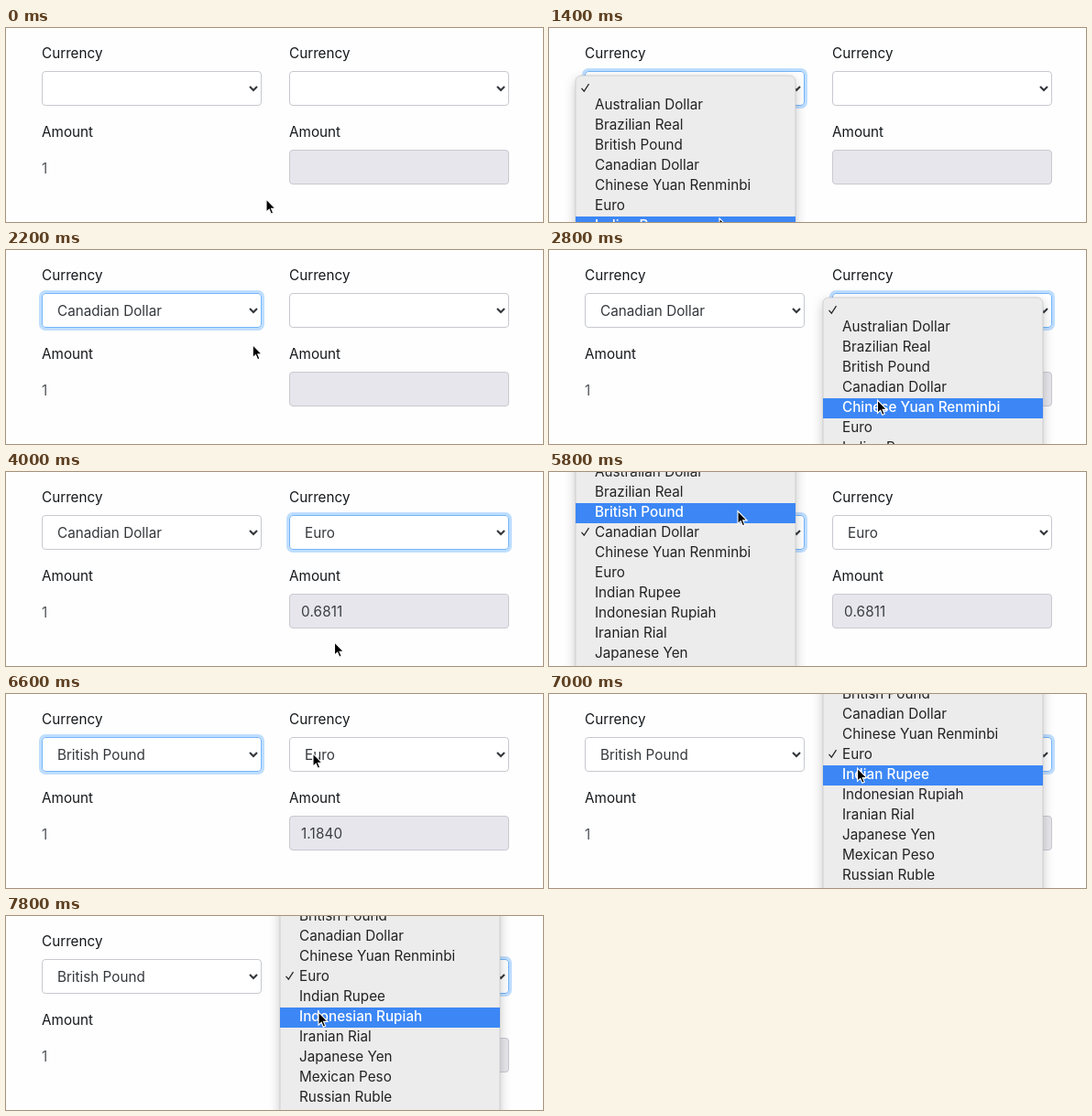
Recreate the animation shown at these times as an HTML page. Size 586 by 212 pixels, loop 8000 ms.

```html
<!DOCTYPE html>
<html lang="en">
<head>
<meta charset="utf-8">
<title>Currency converter</title>
<style>
  html, body { margin: 0; width: 100%; height: 100%; overflow: hidden; background: #fefefe; }
  svg { display: block; font: 430 15.25px Inter, "Liberation Sans", sans-serif; }
  .menu { filter: drop-shadow(0 4px 6px rgba(0, 0, 0, .22)); }
  .value { letter-spacing: .15px; }
</style>
</head>
<body>
<svg id="stage" width="586" height="212" viewBox="0 0 586 212"></svg>
<script>
const LOOP = 8000, STEP = 200, ROW = 22, MIDDLE = 65;
const options = ["", "Australian Dollar", "Brazilian Real", "British Pound", "Canadian Dollar",
  "Chinese Yuan Renminbi", "Euro", "Indian Rupee", "Indonesian Rupiah", "Iranian Rial",
  "Japanese Yen", "Mexican Peso", "Russian Ruble"];
const euros = { "Canadian Dollar": 0.6811, "British Pound": 1.184 };

// Each pick opens a column's menu, passes over one option and settles on another.
// dy is where the pointer tip sits relative to the option's text.
const picks = [
  { col: 0, over: "Indian Rupee", pick: "Canadian Dollar", x: 186, dy: -7,
    opens: 800, passes: 1400, settles: 1600, closes: 2000 },
  { col: 1, over: "Chinese Yuan Renminbi", pick: "Euro", x: 358.5, dy: -7,
    opens: 2600, passes: 2800, settles: 3000, closes: 3600 },
  { col: 0, over: "Canadian Dollar", pick: "British Pound", x: 206, dy: -.5,
    opens: 5000, passes: 5400, settles: 5800, closes: 6400 },
  { col: 1, over: "Iranian Rial", pick: "Indonesian Rupiah", x: 341, dy: -4,
    opens: 6800, passes: 7400, settles: 7800, closes: LOOP }
];

// The chosen row lies over the select; an empty choice has a shorter row.
const firstRow = chosen => chosen ? MIDDLE - ROW * options.indexOf(chosen) : MIDDLE - 4;

function stateAt(t) {
  const s = { chosen: ["", ""], open: -1, focus: -1 };
  for (const p of picks) {
    if (t < p.opens) break;
    s.focus = p.col;
    if (t < p.closes) s.open = p.col;
    else s.chosen[p.col] = p.pick;
  }
  return s;
}

function planPath() {
  const keys = [[0, 284, 187]];
  let freeAt = 0;
  for (const p of picks) {
    const top = firstRow(stateAt(p.opens).chosen[p.col]);
    const tip = name => top + ROW * options.indexOf(name) + p.dy;
    const [, x, y] = keys[keys.length - 1];
    keys.push(
      [Math.max(freeAt, p.opens - 800), x, y],
      [p.opens - 200, p.x - 6, MIDDLE],
      [p.opens, p.x - 6, MIDDLE],
      [p.passes, p.x, tip(p.over)],
      [p.settles, p.x, tip(p.pick)]);
    freeAt = p.closes;
  }
  return keys;
}
const path = planPath();

function pointerAt(t) {
  const i = path.findIndex(key => key[0] > t);
  if (i < 0) return path[path.length - 1].slice(1);
  const [t0, x0, y0] = path[i - 1], [t1, x1, y1] = path[i];
  const u = (t - t0) / (t1 - t0), k = u * u * (3 - 2 * u);
  return [x0 + (x1 - x0) * k, y0 + (y1 - y0) * k];
}

const text = (x, y, str, fill, rest = "") => `<text x="${x}" y="${y}" fill="${fill}" ${rest}>${str}</text>`;
const box = (x, y, w, h, rx, rest) =>
  `<rect x="${x}" y="${y}" width="${w}" height="${h}" rx="${rx}" ${rest}/>`;

function select(x, label, focused) {
  const ring = focused ? box(x - 1.5, 45.5, 243, 41, 5.5, 'fill="none" stroke="#bfdeff" stroke-width="3"') : "";
  return ring +
    box(x + .5, 47.5, 239, 37, 3.5, `fill="#fff" stroke="${focused ? "#74b5fb" : "#c6c9ce"}"`) +
    text(x + 17, 72, label, "#34373b") +
    `<path d="M${x + 227} 64l4 4 4-4" fill="none" stroke="#33363b" stroke-width="2.1"/>`;
}

function menu(x, chosen, py) {
  const first = firstRow(chosen);
  const hover = Math.floor((py - first + 9) / ROW);
  let out = box(x, first - 9, 240, 420, 6, 'class="menu" fill="#ececec" stroke="#bdbdbd" stroke-width=".6"');
  options.forEach((name, i) => {
    const y = first + ROW * i, on = i === hover, pad = i ? 0 : 4;
    const ink = on ? "#fff" : "#222";
    if (on) out += box(x, y - 9 + pad, 240, ROW - pad, 0, 'fill="#3c87f5"');
    if (name === chosen) {
      out += `<path d="M${x + 6.5} ${y + pad + .8}l2.8 3.4 5.2-8" fill="none" stroke="${ink}" stroke-width="1.2"/>`;
    }
    out += text(x + 21, y + 5.7, name, ink, on ? 'font-weight="500"' : "");
  });
  return out;
}

function draw(t) {
  const { chosen, open, focus } = stateAt(t);
  const [px, py] = pointerAt(t);
  const [from, to] = stateAt(t - 200).chosen;
  let out = "";
  [39, 309].forEach((x, col) => {
    out += text(x, 32.7, "Currency", "#15181b") + text(x, 118.7, "Amount", "#15181b") +
      select(x, chosen[col], focus === col);
  });
  out += text(39, 158.7, "1", "#505358");
  out += box(309.5, 133.5, 239, 37, 3.5, 'fill="#e6e6ec" stroke="#c8cad0"');
  if (to) out += text(322, 158, euros[from].toFixed(4), "#3a3d42", 'class="value"');
  if (open >= 0) out += menu(29 + 270 * open, chosen[open], py);
  out += `<path transform="translate(${px} ${py})" d="M0 0V14.2L3.2 11.3 5.3 16.2 7.7 15.2 5.6 10.4H10.1Z"
    fill="#000" stroke="#fff" stroke-width="1.1"/>`;
  stage.innerHTML = out;
}

const stage = document.getElementById("stage");
const start = performance.now();
let shown = -1;
function tick() {
  const t = Math.floor(((performance.now() - start) % LOOP) / STEP) * STEP;
  if (t !== shown) draw(shown = t);
  requestAnimationFrame(tick);
}
tick();
</script>
</body>
</html>
```
